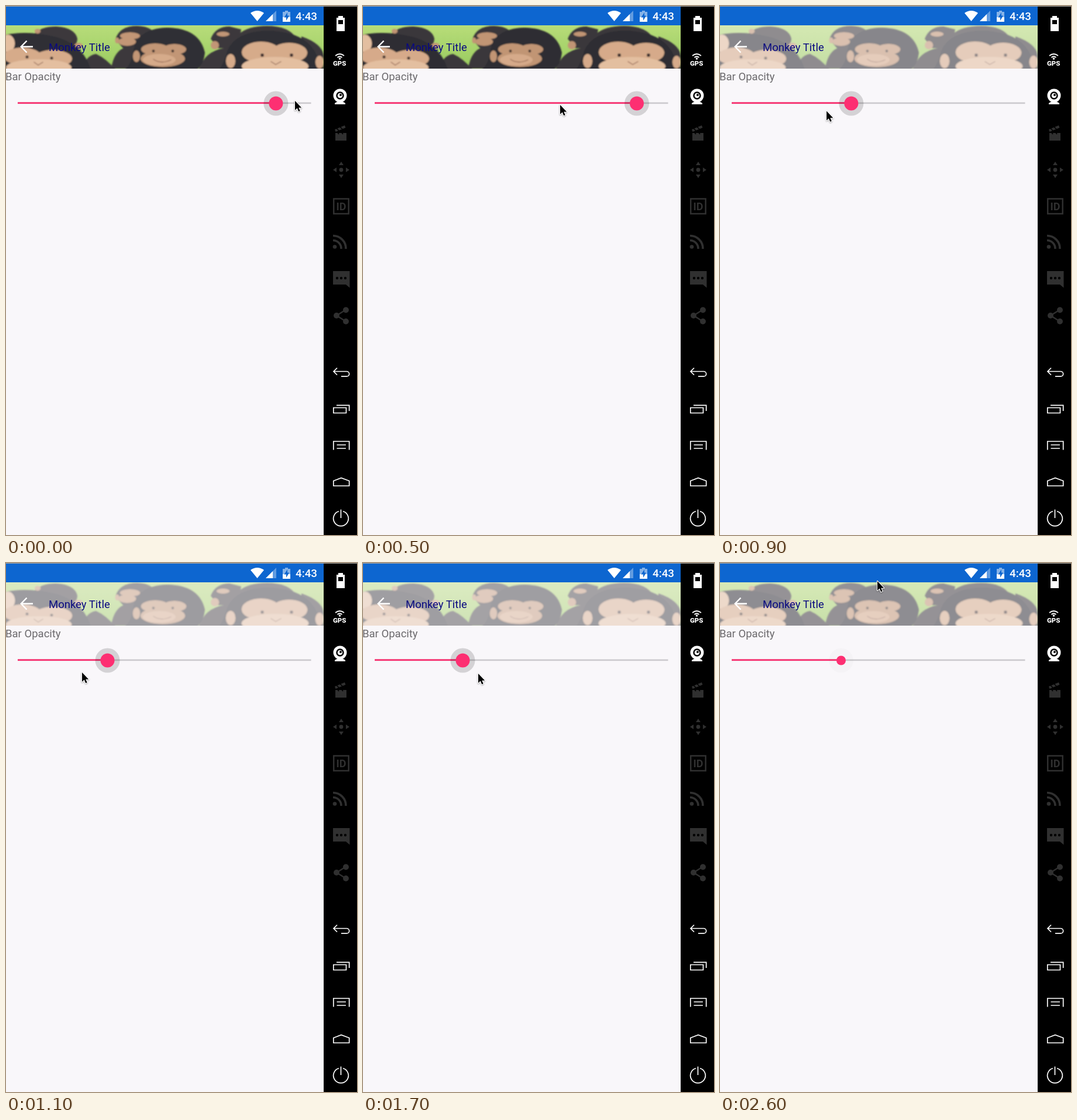
These frames come from a looping animation (600x904 px, 2.7 s). An HTML page:

```html
<!DOCTYPE html>
<html lang="en">
<head>
<meta charset="utf-8">
<title>Bar Opacity</title>
<style>
html, body { margin: 0; width: 100%; height: 100%; overflow: hidden; background: #f9f7fa; }
svg { display: block; width: 600px; height: 904px; }
text { font-family: Roboto, sans-serif; }
.dark { fill: #1d1a20; }
.back { fill: #29262b; }
.tan { fill: #bd8d69; }
.peach { fill: #d3a480; }
.light { fill: #e2ba98; }
.eye { fill: #33231f; }
.smile { fill: none; stroke: #8a5a45; stroke-width: 1.3; stroke-linecap: round; }
.line { fill: none; stroke: #fff; stroke-width: 1.7; }
.dim { fill: #303030; }
.dimline { fill: none; stroke: #303030; }
</style>
</head>
<body>
<svg viewBox="0 0 600 904" xmlns="http://www.w3.org/2000/svg">
  <defs>
    <clipPath id="bar"><rect y="33" width="543" height="74"/></clipPath>
    <linearGradient id="grass" x2="0" y2="1">
      <stop stop-color="#b4dc70"/><stop offset="1" stop-color="#8fc650"/>
    </linearGradient>
    <filter id="soft"><feGaussianBlur stdDeviation=".9"/></filter>
    <filter id="shade" x="-50%" y="-50%" width="200%" height="200%">
      <feDropShadow dx="0" dy="1" stdDeviation="1" flood-opacity=".4"/>
    </filter>
  </defs>
  <rect width="600" height="904" fill="#f9f7fa"/>

  <g clip-path="url(#bar)">
    <g id="photo">
      <rect x="-5" y="28" width="553" height="84" fill="url(#grass)"/>
      <g filter="url(#soft)">
        <g class="back">
          <path d="M48 48 Q60 35 86 35 Q118 37 122 56 Q121 70 108 76 H60Z"/>
          <path d="M187 57 Q194 34 224 34 Q252 35 256 52 L240 72 H200Z"/>
          <path d="M180 107 Q184 76 206 70 H240 V107Z"/>
          <path d="M350 56 Q358 35 382 35 L402 40 L396 72 H362Z"/>
          <path d="M398 48 Q414 34 446 34 Q484 34 497 56 L470 70 H400Z"/>
          <path d="M330 107 Q340 78 372 72 L396 66 V110 H330Z"/>
          <path d="M505 52 Q540 64 543 84 V112 H505Z"/>
          <path d="M128 112 Q136 84 154 82 Q172 90 190 112Z"/>
        </g>
        <g class="tan">
          <ellipse cx="54" cy="43" rx="5" ry="4"/>
          <ellipse cx="212" cy="51" rx="17" ry="6"/>
          <ellipse cx="207" cy="61" rx="15" ry="7"/>
          <ellipse cx="190" cy="59" rx="3.500" ry="5"/>
          <ellipse cx="236" cy="69" rx="13" ry="4"/>
          <ellipse cx="357" cy="67" rx="7" ry="7"/>
          <ellipse cx="371" cy="48" rx="11" ry="4"/>
          <ellipse cx="124" cy="68" rx="7" ry="5"/>
        </g>

        <path class="dark" d="M-4 50 Q30 42 72 50 Q132 60 146 112 H-4Z"/>
        <ellipse class="light" cx="3" cy="64" rx="12" ry="15"/>
        <g class="peach">
          <ellipse cx="28" cy="86" rx="32" ry="15"/>
          <ellipse cx="80" cy="90" rx="33" ry="15"/>
        </g>
        <ellipse class="light" cx="56" cy="105" rx="56" ry="14"/>
        <circle class="eye" cx="36" cy="87" r="2.600"/><circle class="eye" cx="78" cy="89" r="2.600"/>
        <path class="smile" d="M48 96 L55 101 L63 96"/>

        <path class="dark" d="M200 112 Q216 99 218 74 Q226 38 276 37 Q331 38 340 80 Q338 100 324 112Z"/>
        <g class="tan">
          <ellipse cx="223" cy="86" rx="6" ry="10"/>
          <ellipse cx="255" cy="74" rx="24" ry="10"/>
          <ellipse cx="288" cy="74" rx="20" ry="9"/>
          <ellipse cx="268" cy="90" rx="38" ry="14"/>
        </g>
        <ellipse class="peach" cx="262" cy="92" rx="28" ry="10"/>
        <circle class="eye" cx="252" cy="77" r="2.400"/><circle class="eye" cx="285" cy="77" r="2.400"/>
        <path class="smile" d="M252 91 Q265 100 282 92"/>

        <path class="dark" d="M362 112 Q374 96 378 77 Q392 43 448 42 Q515 44 532 86 L536 112Z"/>
        <g class="peach">
          <ellipse cx="384" cy="94" rx="8" ry="12"/>
          <ellipse cx="536" cy="96" rx="7" ry="11"/>
          <ellipse cx="436" cy="79" rx="33" ry="18"/>
          <ellipse cx="484" cy="80" rx="31" ry="17"/>
        </g>
        <ellipse class="light" cx="460" cy="103" rx="57" ry="16"/>
        <circle class="eye" cx="438" cy="84" r="3"/><circle class="eye" cx="488" cy="84" r="3"/>
        <path class="smile" d="M453 95 L461 100 L470 95"/>
      </g>
    </g>
  </g>
  <path d="M46 69.500H26M35.500 59.500L25.800 69.500L35.500 79.500" fill="none" stroke="#fff" stroke-width="2.500"/>
  <text x="73" y="77" font-size="18.500" fill="#0a0a80">Monkey Title</text>
  <text x="-1" y="127" font-size="18.500" fill="#6b696c">Bar Opacity</text>

  <rect width="543" height="33" fill="#0d66d0"/>
  <path d="M418 12 Q429.500 4 441 12 L429.500 26Z" fill="#fff"/>
  <path d="M444 26 L462 8 V26Z" fill="#fff" opacity=".35"/>
  <path d="M444 26 L456 14 V26Z" fill="#fff"/>
  <path d="M473 10 H477 V8 H482 V10 H486 V27 H473Z" fill="#fff" opacity=".5"/>
  <path d="M473 19 H486 V27 H473Z" fill="#fff"/>
  <path d="M481 11 L475.500 19.500 H479 V25 L484 16.500 H481Z" fill="#0d66d0"/>
  <text x="495" y="24" font-size="18.800" font-weight="500" fill="#fff">4:43</text>

  <rect x="20" y="164.600" width="501.500" height="2.600" fill="#cbc9cd"/>
  <rect id="fill" x="20" y="164.400" height="2.700" fill="#f92c6c"/>
  <g id="knob">
    <circle id="halo" r="21"/>
    <circle id="thumb" fill="#fd2f72"/>
  </g>

  <rect x="543" width="57" height="904"/>
  <rect width="600" height="1" fill="#aaa69f"/>

  <g fill="#fff">
    <path d="M568 17 H576 V20 H579 V43 H565 V20 H568Z"/>
    <rect x="568" y="24" width="8" height="7" fill="#000"/>
    <circle cx="570.500" cy="90" r="1.800"/>
    <path class="line" d="M566.500 88 Q570.500 84.500 574.500 88M563 85 Q570.500 79 578 85"/>
    <text x="570.300" y="102" font-size="11.500" font-weight="900" text-anchor="middle">GPS</text>
    <circle cx="571" cy="153" r="11.500"/>
    <circle cx="571" cy="153" r="5.500" fill="none" stroke="#000" stroke-width="2.500"/>
    <circle cx="572" cy="152" r="2" fill="#000"/>
    <path d="M567 163 H575 L580 166 V168 H562 V166Z"/>
  </g>

  <g class="dim">
    <path d="M563 217 H582 V230 H563Z"/>
    <path d="M562 211 L579 204 L580.500 208 L563.500 215Z"/>
    <path d="M565 209 L569 213M571 206.500 L575 210.500M566 215 L569 219M573 215 L576 219" stroke="#000" stroke-width="1.700"/>
    <circle cx="573" cy="280" r="3.400"/>
    <path d="M573 266 L577 272 H569ZM573 294 L577 288 H569ZM559 280 L565 276 V284ZM587 280 L581 276 V284Z"/>
    <rect class="dimline" x="560.200" y="329.500" width="25.500" height="25.500" stroke-width="2.500"/>
    <text x="573" y="349" font-size="18" font-weight="700" text-anchor="middle">ID</text>
    <circle cx="562" cy="411.500" r="3.300"/>
    <path class="dimline" d="M559 400.500 A14 14 0 0 1 573 415M559 392.500 A22 22 0 0 1 581 415" stroke-width="3.600"/>
    <path d="M559 453 H587.500 V481.500 L581 476 H559Z"/>
    <g fill="#000"><circle cx="566" cy="465" r="2.200"/><circle cx="573" cy="465" r="2.200"/><circle cx="580" cy="465" r="2.200"/></g>
    <path class="dimline" d="M581 519 L565 529 L581 539" stroke-width="2.400"/>
    <circle cx="565" cy="529" r="5"/><circle cx="581" cy="519.500" r="5"/><circle cx="581" cy="539" r="5"/>
  </g>

  <g class="line">
    <path d="M566 618.500 L560 624.500 L566 630.500M560 624.500 H582.500 A4.200 4.200 0 0 1 582.500 632.900 H573"/>
    <path d="M559.800 686.500 H581.500 V695.500 H559.800ZM565 682.300 H586.700 V692"/>
    <path d="M559.800 758.500 V744 H586.700 V758.500M565.500 750 H581M565.500 756 H581"/>
    <path d="M559.800 820 V811.500 L573 806.500 L586.700 811.500 V820Z"/>
    <path d="M569 863.500 A12.800 12.800 0 1 0 576 863.500M572.500 860.500 V875"/>
  </g>

  <g id="cursor" filter="url(#shade)">
    <path d="M1 1 V17 L4.700 13.600 L7.200 19.300 L9.700 18.200 L7.300 12.700 H12.200Z"
      fill="#000" stroke="#fff" stroke-width="2" paint-order="stroke" stroke-linejoin="round"/>
  </g>
</svg>
<script>
const LOOP = 2700, STEP = 100, LAG = 1.7, RELEASE = 18;

// pointer path: step, x, y
const path = [
  [-1.7, 461.4, 160], [0, 493, 161], [1, 512, 163], [2, 508, 165], [3.3, 468, 167],
  [5, 336, 168], [7, 232, 169], [9.3, 173.5, 180], [11, 129, 186], [12.5, 110, 188],
  [13.5, 115, 189], [15.3, 170.5, 189], [17, 196, 188], [18, 207, 187],
  [19, 235, 198], [22, 495, 319], [24, 400, 168], [26, 268, 30]
];
// after release: step, thumb radius, halo opacity
const release = [[20, 12, .15], [22, 9, .125], [23, 8, .1], [26, 8, .015]];

const $ = id => document.getElementById(id);
const photo = $('photo'), fill = $('fill'), knob = $('knob');
const halo = $('halo'), thumb = $('thumb'), cursor = $('cursor');

function sample(keys, s) {
  if (s <= keys[0][0]) return keys[0].slice(1);
  const n = keys.findIndex(k => k[0] >= s);
  if (n < 0) return keys[keys.length - 1].slice(1);
  const a = keys[n - 1], b = keys[n], f = (s - a[0]) / (b[0] - a[0]);
  return [1, 2].map(i => a[i] + (b[i] - a[i]) * f);
}

function draw(t) {
  const s = Math.floor((t % LOOP) / STEP);
  const [x, y] = sample(path, s);
  const [value] = sample(path, Math.min(s - LAG, RELEASE));
  const [radius, glow] = sample(release, s);
  cursor.setAttribute('transform', `translate(${x} ${y})`);
  knob.setAttribute('transform', `translate(${value} 166.5)`);
  fill.setAttribute('width', value - 20);
  thumb.setAttribute('r', radius);
  halo.setAttribute('opacity', glow);
  photo.setAttribute('opacity', ((value - 20) / 501) ** .75);
}

const start = performance.now();
function tick() {
  draw(performance.now() - start);
  requestAnimationFrame(tick);
}
tick();
</script>
</body>
</html>
```
